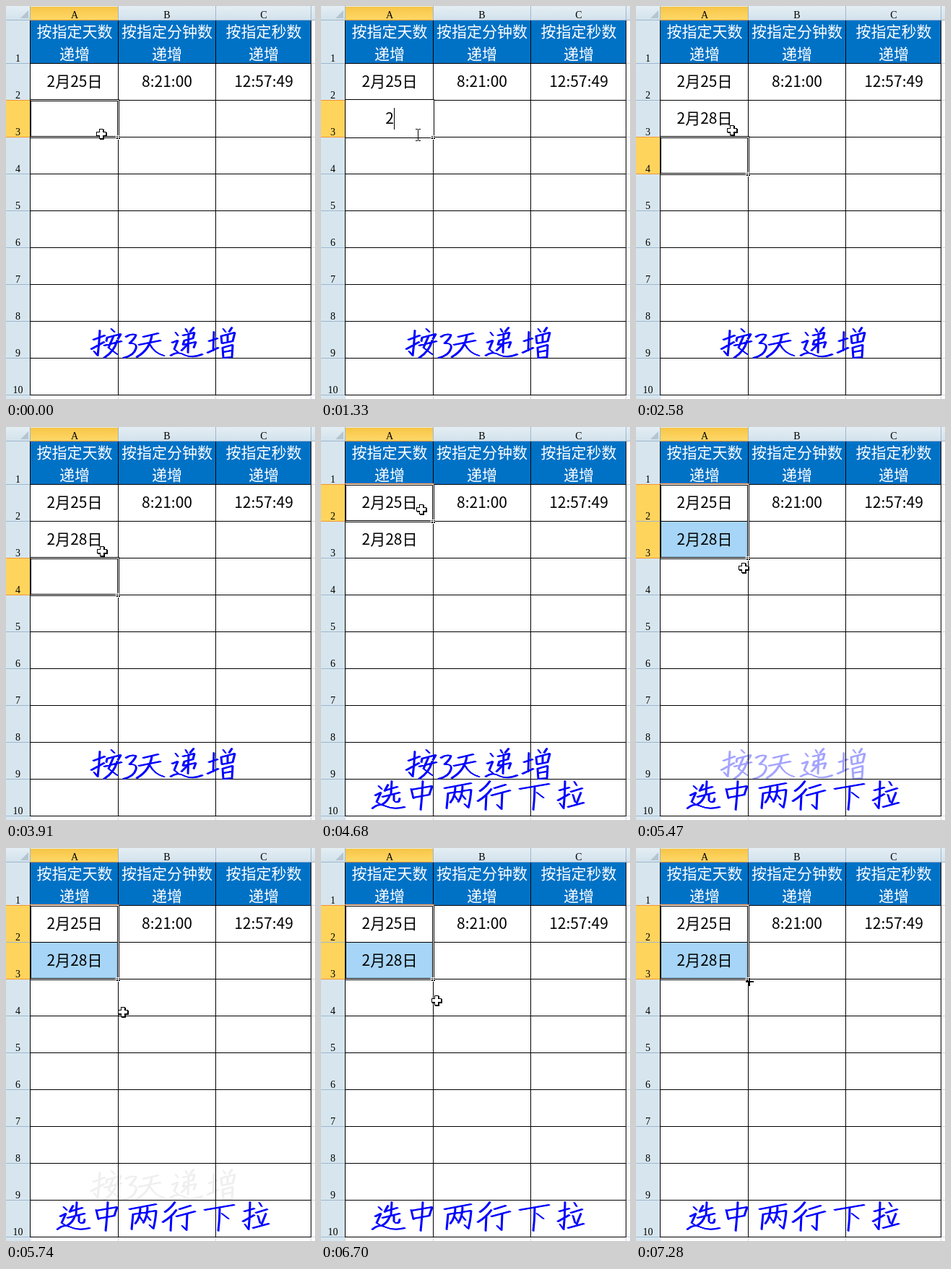
An HTML page with a canvas that plays this animation: 428 px wide and 544 px high, repeating every 8000 ms.

```html
<!DOCTYPE html>
<html lang="zh">
<head>
<meta charset="utf-8">
<style>
html, body { margin: 0; width: 100%; height: 100%; overflow: hidden; background: #fff; }
canvas { display: block; }
</style>
</head>
<body>
<canvas id="stage" width="428" height="544"></canvas>
<script>
const ctx = document.getElementById('stage').getContext('2d');
const LOOP = 8000;
const CELL = '21px "Noto Sans CJK SC", "Noto Sans CJK", sans-serif';
const HEAD = '14px "Liberation Serif", serif';
const COLS = [33, 155, 290, 422];
const MID = [95, 223, 357];
const BLACK = '#000', GOLD = '#ffd45c', RULE = '#9eb6ce';

// Handwritten captions, one path per character
const caption1 = [
  'M121 462L137 456M130 449Q129 468 127 484L122 478M118 475L136 465M146 447L150 451M139 464L140 459L159 454L155 461M149 457Q145 466 142 473L154 482M154 463Q150 478 136 487M136 470L160 464',
  'M166 458Q173 453 180 455Q179 460 171 467Q182 466 180 474Q177 484 163 487',
  'M190 458L211 453M184 469L214 463M202 456Q199 476 181 486M199 468Q206 481 219 484',
  'M235 452L238 456M230 466L238 463L233 475L238 479M228 484Q238 477 247 483Q258 488 272 482M249 447L251 451M260 445L255 451M245 456L261 452L259 460L247 463L245 469L263 465L260 473M253 453L252 480M252 468L243 477',
  'M281 464L293 460M288 451L287 477M279 480L294 473M301 447L304 451M313 445L309 451M299 467L298 457L317 452L314 464L299 467M307 455L307 465M301 487L300 473L314 469L313 486L301 487M301 479L312 477'
].map(d => new Path2D(d));
const caption2 = [
  'M93 495L88 504M89 503L106 498M98 490L97 508M85 512L109 506M95 510Q93 518 84 523M101 508L101 517Q104 521 108 518L109 514M80 497L84 501M75 510L83 506L77 519L82 522M71 528Q80 520 90 525Q101 530 116 526',
  'M125 501L128 514M125 502L154 497L150 509L128 513M141 490Q140 512 138 530',
  'M171 500L208 493M176 507L174 528M176 507L208 502Q207 516 204 527L199 522M186 498Q186 512 179 520M185 510L189 516M196 497Q196 510 190 519M195 509L200 515',
  'M234 490Q229 498 220 504M236 501Q229 511 217 518M229 510L228 530M240 500L256 495M236 510L262 503M251 506L250 529L244 523',
  'M275 501L316 494M296 498Q296 514 294 530M299 506L308 513',
  'M330 503L344 499M338 490Q338 510 336 528L331 521M328 517L344 508M351 491L354 496M346 505L362 500M349 509L352 519M360 506L354 521M342 526L364 520'
].map(d => new Path2D(d));

// Typed text in A3
const typing = [[1330, '2'], [1690, '2-'], [1990, '2-2'], [2220, '2-28']];

// Pointer: time, x, y
const route = [[0, 132, 177], [2579, 132, 177], [2580, 133, 172], [3910, 133, 172],
  [4420, 139, 114], [4860, 139, 114], [5140, 141, 143], [5470, 149, 195],
  [5740, 162, 227], [6400, 162, 227], [7180, 157, 186], [LOOP, 157, 186]];

const lineAt = row => 79 + 51 * (row - 2);
const clamp = v => Math.max(0, Math.min(1, v));

function box(x, y, w, h, color) {
  ctx.fillStyle = color;
  ctx.fillRect(x, y, w, h);
}
function frame(l, t, r, b, color) {
  ctx.strokeStyle = color;
  ctx.lineWidth = 1;
  ctx.strokeRect(l + .5, t + .5, r - l, b - t);
}
function label(text, x, y, font, color = BLACK) {
  ctx.font = font;
  ctx.textAlign = 'center';
  ctx.fillStyle = color;
  ctx.fillText(text, x, y);
}

function pointerAt(t) {
  const i = Math.max(1, route.findIndex(p => p[0] > t));
  const [t0, x0, y0] = route[i - 1], [t1, x1, y1] = route[i];
  const k = (t - t0) / (t1 - t0);
  return [Math.round(x0 + (x1 - x0) * k), Math.round(y0 + (y1 - y0) * k)];
}

function sheet(first, last) {
  box(0, 0, 428, 544, '#fff');
  box(0, 0, 33, 544, '#d7e6ee');
  const shade = ctx.createLinearGradient(0, 0, 0, 19);
  shade.addColorStop(0, '#e4eef4');
  shade.addColorStop(1, '#d3e2ec');
  box(0, 0, 428, 19, shade);
  const gold = ctx.createLinearGradient(0, 0, 0, 19);
  gold.addColorStop(0, '#f6c444');
  gold.addColorStop(1, '#ffd868');
  box(34, 1, 121, 18, gold);
  box(0, 19, 428, 1, RULE);
  box(34, 19, 121, 1, '#f29536');

  ctx.fillStyle = '#b4c5d0';
  ctx.beginPath();
  ctx.moveTo(31, 6);
  ctx.lineTo(31, 17);
  ctx.lineTo(20, 17);
  ctx.fill();

  box(34, 20, 388, 59, '#0072c6');
  for (let row = 1; row <= 10; row++) {
    const y = lineAt(row + 1);
    const on = row >= first && row <= last;
    if (on) box(0, lineAt(row) + 1, 33, 50, GOLD);
    box(0, y, 33, 1, RULE);
    box(423, y, 5, 1, '#d0d7e5');
    box(33, y, 390, 1, BLACK);
    label(row, 16.5, y - 2, HEAD);
  }
  box(0, lineAt(first), 33, 1, '#f29536');
  box(0, lineAt(last + 1), 33, 1, '#f29536');
  COLS.forEach(x => {
    box(x, 0, 1, 20, RULE);
    box(x, 20, 1, 519, BLACK);
    box(x, 539, 1, 5, '#d0d7e5');
  });
  ['天', '分钟', '秒'].forEach((unit, i) => {
    label('ABC'[i], MID[i], 17, HEAD);
    label('按指定' + unit + '数', MID[i], 43, CELL, '#fff');
    label('递增', MID[i], 74, CELL, '#fff');
  });
}

function selection(first, last, editing) {
  const t = lineAt(first), b = lineAt(last + 1);
  if (last > first) box(34, t + 52, 121, 50, '#a6d5f7');
  ctx.save();
  ctx.beginPath();
  ctx.rect(33, 20, 390, 524);
  ctx.clip();
  frame(32, t - 1, 156, b + 1, BLACK);
  if (first === 2) box(33, t - 1, 124, 1, '#ff8d39');
  frame(33, t, 155, b, '#fff');
  if (!editing) frame(34, t + 1, 154, b - 1, BLACK);
  box(33, t, 1, b - t + 1, BLACK);
  ctx.restore();
  box(152, b - 2, 6, 6, '#fff');
  box(153, b - 1, 5, 4, BLACK);
  box(155, b - 1, 1, 4, '#fff');
  box(153, b, 5, 1, '#fff');
}

function ink(paths, alpha, gray) {
  if (alpha <= 0) return;
  const v = Math.round(255 * (1 - alpha));
  ctx.save();
  if (alpha < 1) ctx.globalCompositeOperation = 'darken';
  ctx.strokeStyle = gray ? '#efefef' : `rgb(${v},${v},255)`;
  ctx.lineWidth = 1.4;
  ctx.lineCap = ctx.lineJoin = 'round';
  for (const dx of [-.8, 0, .8]) {
    ctx.save();
    ctx.translate(dx, dx * .4);
    paths.forEach(p => ctx.stroke(p));
    ctx.restore();
  }
  ctx.restore();
}

function fatCross(x, y) {
  const cross = (s, color, dx = 0, dy = 0) => {
    box(x - 3 + s + dx, y - 7 + s + dy, 6 - 2 * s, 14 - 2 * s, color);
    box(x - 7 + s + dx, y - 3 + s + dy, 14 - 2 * s, 6 - 2 * s, color);
  };
  cross(0, BLACK, 1, 1);
  cross(0, BLACK);
  cross(1, '#fff');
}
function beam(x, y) {
  box(x, y - 7, 1, 15, BLACK);
  for (const dy of [-8, 8]) {
    box(x - 3, y + dy, 3, 1, BLACK);
    box(x + 1, y + dy, 3, 1, BLACK);
  }
}
function thinCross(x, y) {
  box(x - 1, y - 5, 2, 11, BLACK);
  box(x - 5, y - 1, 11, 2, BLACK);
}

function draw(t) {
  const [x, y] = pointerAt(t);
  const editing = t >= 1330 && t < 2580;
  const first = t < 2580 ? 3 : t < 4680 ? 4 : 2;
  const last = first > 2 ? first : t > 4860 && y > 131 ? 3 : 2;

  sheet(first, last);
  selection(first, last, editing);
  ['2月25日', '8:21:00', '12:57:49'].forEach((s, i) => label(s, MID[i], 112, CELL));
  if (editing) {
    const text = typing.filter(k => k[0] <= t).pop()[1];
    label(text, 95, 163, CELL);
    box(Math.round(95 + ctx.measureText(text).width / 2), 141, 1, 30, BLACK);
  } else if (t >= 2580) {
    label('2月28日', 95, 163, CELL);
  }

  const ghost = t >= 5740;
  if (t < 6400) ink(caption1, ghost ? .06 : clamp((5795 - t) / 895), ghost);
  ink(caption2, clamp((t - 3910) / 510));

  if (editing) beam(134, 178);
  else if (t >= 7280) thinCross(157, 185);
  else fatCross(x, y);
}

const start = performance.now();
function tick() {
  draw((performance.now() - start) % LOOP);
  requestAnimationFrame(tick);
}
tick();
</script>
</body>
</html>
```
